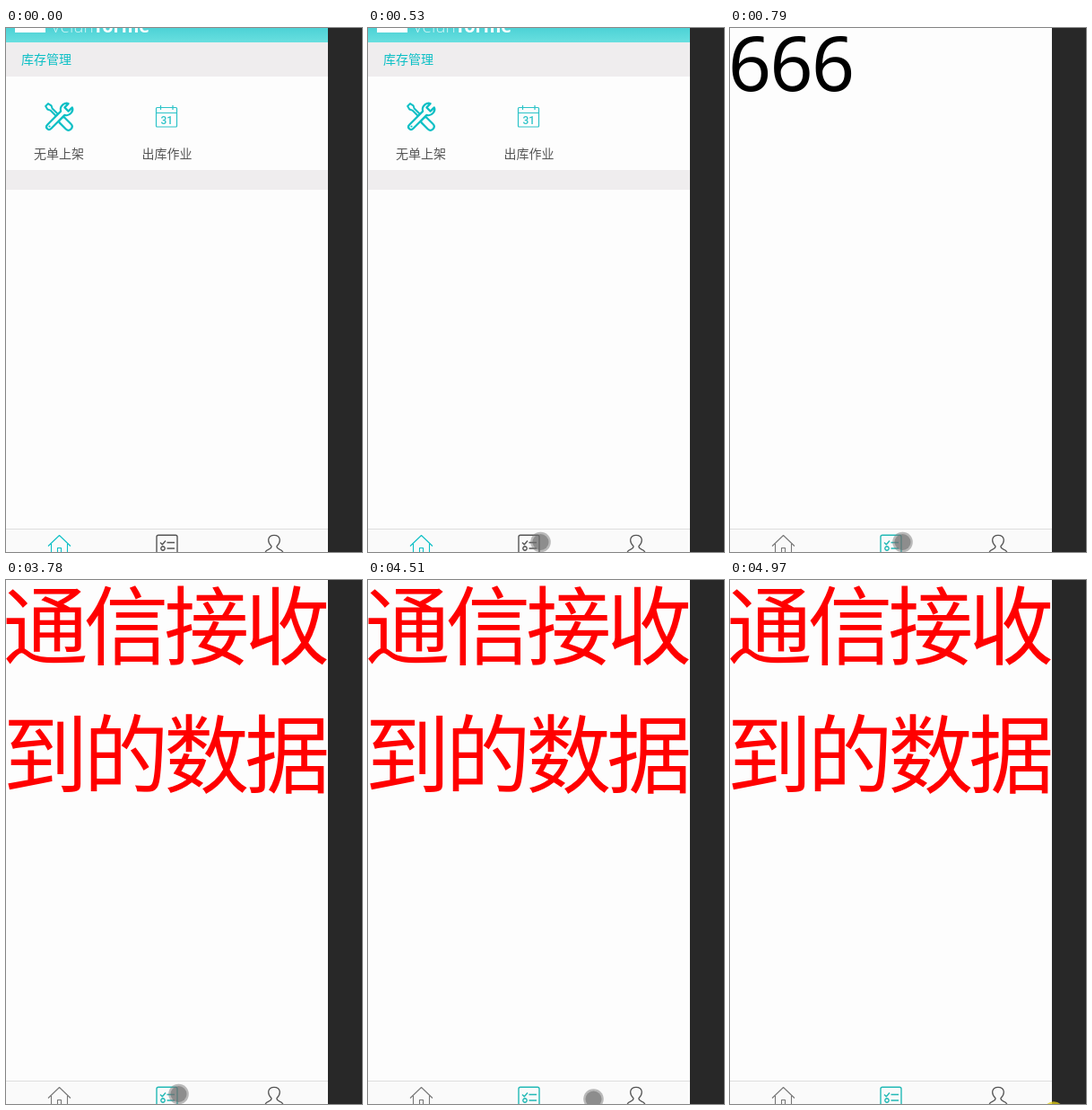
An HTML page with a canvas for the animation above (5.1 s loop, 397 by 583 pixels).

```html
<!DOCTYPE html>
<html lang="zh-CN">
<head>
<meta charset="utf-8">
<style>
html, body { margin: 0; width: 100%; height: 100%; overflow: hidden; background: #fdfdfd; }
canvas { display: block; }
</style>
</head>
<body>
<canvas id="stage" width="397" height="583"></canvas>
<script>
const ctx = document.getElementById('stage').getContext('2d');
const LOOP = 5100;
const TEAL = '#0bbfc5', GREY = '#555';
const CJK = '"Noto Sans CJK SC", "Noto Sans CJK", sans-serif';

// Touch pointer: [start ms, x, y]; without x it is hidden
const touches = [
  [0], [390, 203, 588], [460, 196, 577], [530, 192.5, 572],
  [4370, 212, 572], [4440, 232, 574], [4510, 251.5, 577.5], [4580, 268, 586], [4640]
];

function rect(x, y, w, h, fill) {
  ctx.fillStyle = fill;
  ctx.fillRect(x, y, w, h);
}

function disc(x, y, r, fill) {
  ctx.fillStyle = fill;
  ctx.beginPath();
  ctx.arc(x, y, r, 0, Math.PI * 2);
  ctx.fill();
}

function text(str, x, y, font, fill, spacing = 0) {
  ctx.font = font;
  ctx.fillStyle = fill;
  ctx.letterSpacing = spacing + 'px';
  ctx.fillText(str, x, y);
}

function line(d, color, width, fill) {
  const p = new Path2D(d);
  if (fill) {
    ctx.fillStyle = fill;
    ctx.fill(p);
  }
  ctx.strokeStyle = color;
  ctx.lineWidth = width;
  ctx.stroke(p);
}

function turned(x, y, deg, draw) {
  ctx.save();
  ctx.translate(x, y);
  ctx.rotate(deg * Math.PI / 180);
  draw();
  ctx.restore();
}

function toolsIcon() {
  turned(59, 99, -45, () => {
    line('M-1.5 3V-12L-3 -15L-2 -19H2L3 -15L1.5 -12V3', TEAL, 2, '#fdfdfd');
    line('M-4 5Q-4 3 -2 3H2Q4 3 4 5V15Q4 19 0 19Q-4 19 -4 15Z', TEAL, 2.2, '#fdfdfd');
  });
  turned(59, 99, 45, () => {
    line('M-3 -6V15Q-3 18.5 0 18.5Q3 18.5 3 15V-6Q7 -8 6.5 -13Q6 -17 3 -18V-12H-3V-18Q-6 -17 -6.5 -13Q-7 -8 -3 -6Z',
      TEAL, 2.2, '#fdfdfd');
  });
  disc(48.5, 109.5, 1.1, TEAL);
}

function calendarIcon() {
  line('M168.5 88.5H189.5Q190.5 88.5 190.5 89.5V109Q190.5 110 189.5 110H168.5Q167.5 110 167.5 109V89.5Q167.5 88.5 168.5 88.5Z' +
    'M167.5 94.5H190.5M172.5 86V91M186 86V91', '#2cc3c8', 1.2);
  text('31', 172.5, 107, '500 12px Roboto, sans-serif', '#2cc3c8');
}

function homePage() {
  const g = ctx.createLinearGradient(0, 0, 0, 16);
  g.addColorStop(0, '#4dd2d6');
  g.addColorStop(1, '#68dfdf');
  rect(0, 0, 359, 16, g);
  rect(10, -29, 34, 34, '#fff');
  text('Velun', 50, 5, '300 19px "Open Sans", sans-serif', '#d4f5f5');
  text('Torme', 97, 5, 'bold 20px "Open Sans", sans-serif', '#fff');
  rect(0, 16, 359, 38, '#efedee');
  rect(0, 158, 359, 22, '#efedee');
  text('库存管理', 17, 40, '14px ' + CJK, TEAL);
  toolsIcon();
  calendarIcon();
  text('无单上架', 31, 145, '14px ' + CJK, GREY);
  text('出库作业', 151.5, 145, '14px ' + CJK, GREY);
}

function dataPage(received) {
  if (!received) {
    text('666', -2, 70, '84px "Noto Sans", sans-serif', '#000', -1.5);
    return;
  }
  ['通信接收', '到的数据'].forEach((row, i) =>
    text(row, -3.5, 87 + i * 142.5, '95px ' + CJK, '#f00', -5.1));
}

function tabBar(listActive) {
  const home = listActive ? '#777' : TEAL;
  const list = listActive ? '#22b9b6' : GREY;
  rect(0, 557, 359, 26, '#fafafa');
  rect(0, 557, 359, 1, '#dedede');
  line('M47 576.5L59.5 564.5L72 576.5M50.5 574V590M68.5 574V590M57.5 590V578.5H61.5V590', home, 1.1);
  line('M170 564.2H189Q191 564.2 191 566.2V586H168V566.2Q168 564.2 170 564.2Z', list, 1.4);
  line('M172 572.5L174.3 574.7L178 570.5M179.5 572.5H188M179.5 579H188' +
    'M177.2 579A2.2 2.2 0 1 1 172.8 579A2.2 2.2 0 1 1 177.2 579', list, 1.4);
  line('M289 584C289.5 579 296.5 581 296 576.5C291 572 291.5 564.3 299 564.3C306.5 564.3 307 572 302 576.5C301.5 581 308.5 579 309 584',
    GREY, 1.3);
}

function pointer(t) {
  const [, x, y] = touches.filter(p => p[0] <= t).pop();
  if (x === undefined) return;
  disc(x, y, 11.3, 'rgba(120,120,120,.5)');
  disc(x, y, 9, 'rgba(105,105,105,.55)');
}

function draw(t) {
  rect(0, 0, 359, 583, '#fdfdfd');
  if (t < 790) homePage();
  else dataPage(t >= 3780);
  tabBar(t >= 730);
  rect(359, 0, 38, 583, '#282828');
  pointer(t);
  if (t >= 4970) disc(361, 592.3, 12, 'rgba(228,208,20,.75)');
}

ctx.lineJoin = 'round';
const start = performance.now();
function tick() {
  draw((performance.now() - start) % LOOP);
  requestAnimationFrame(tick);
}
tick();
</script>
</body>
</html>
```
